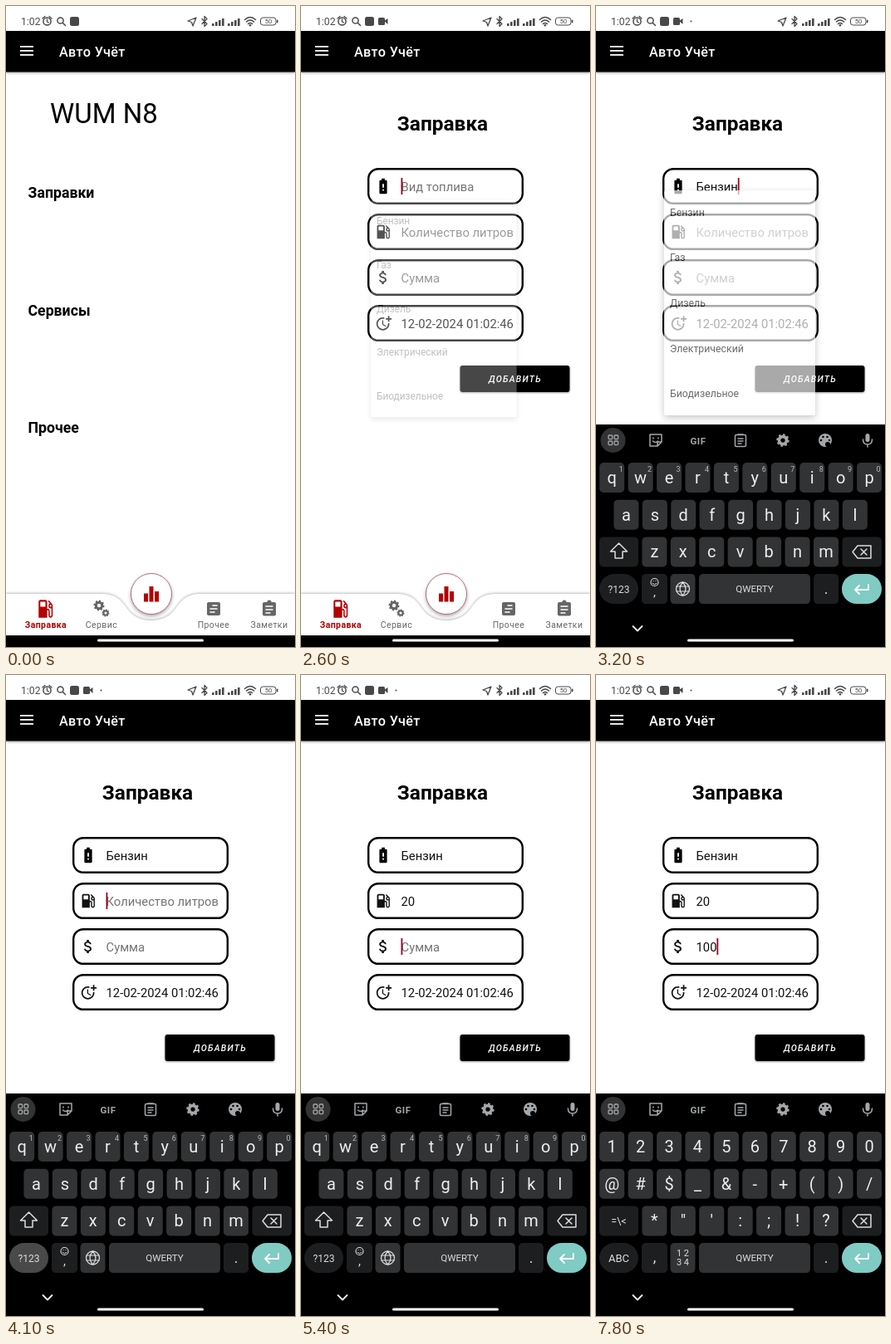
An HTML page for the animation above (8 s loop, 348 by 772 pixels).

```html
<!DOCTYPE html>
<html lang="ru">
<head>
<meta charset="utf-8">
<style>
html, body { margin: 0; width: 100%; height: 100%; overflow: hidden; background: #fff; }
svg { display: block; width: 100vw; height: 100vh; }
text { font-family: Roboto, "Noto Sans", sans-serif; white-space: pre; }
.line { fill: none; stroke-linecap: round; stroke-linejoin: round; }
</style>
</head>
<body>
<svg id="stage" viewBox="0 0 348 772"></svg>
<script>
const RED = '#b40000', GRAY = '#666', KEY = '#323335', DARK = '#1d1e20', PALE = '#a4a8aa';

const text = (x, y, size, str, attrs = '') => `<text x="${x}" y="${y}" font-size="${size}" ${attrs}>${str}</text>`;
const mid = (x, y, size, str, attrs = '') => text(x, y, size, str, 'text-anchor="middle" ' + attrs);
const rect = (x, y, w, h, r, fill, attrs = '') =>
  `<rect x="${x}" y="${y}" width="${w}" height="${h}" rx="${r}" fill="${fill}" ${attrs}/>`;
const disc = (x, y, r, fill, attrs = '') => `<circle cx="${x}" cy="${y}" r="${r}" fill="${fill}" ${attrs}/>`;
const line = (d, color, width = 1.5) => `<path class="line" d="${d}" stroke="${color}" stroke-width="${width}"/>`;
const ring = (x, y, r, color, width = 1.5) => disc(x, y, r, 'none', `stroke="${color}" stroke-width="${width}"`);
// 24-unit icon centred on a point
const icon = (x, y, sx, d, fill, sy = sx) =>
  `<path transform="translate(${x} ${y}) scale(${sx} ${sy}) translate(-12 -12)" d="${d}" fill="${fill}" fill-rule="evenodd"/>`;
const gear = (x, y, r, color) => ring(x, y, r * .6, color, r * .5) +
  disc(x, y, r * .88, 'none', `stroke="${color}" stroke-width="${r * .3}" pathLength="16" stroke-dasharray="1"`);
const group = (id, body, attrs = '') => `<g id="${id}" ${attrs}>${body}</g>`;

const PUMP = 'M19.77 7.23l.01-.01-3.72-3.72L15 4.56l2.11 2.11c-.94.36-1.61 1.26-1.61 2.33 0 1.38 1.12 2.5 2.5 2.5.36 0 .69-.08 1-.21v7.21c0 .55-.45 1-1 1s-1-.45-1-1V14c0-1.1-.9-2-2-2h-1V5c0-1.1-.9-2-2-2H6c-1.1 0-2 .9-2 2v16h10v-7.5h1.5v5c0 1.38 1.12 2.5 2.5 2.5s2.5-1.12 2.5-2.5V9c0-.69-.28-1.32-.73-1.77zM12 10H6V5h6v5zm6 0c-.55 0-1-.45-1-1s.45-1 1-1 1 .45 1 1-.45 1-1 1z';
const BATTERY = 'M15.67 4H14V2h-4v2H8.33C7.6 4 7 4.6 7 5.33v15.33C7 21.4 7.6 22 8.33 22h7.33c.74 0 1.34-.6 1.34-1.33V5.33C17 4.6 16.4 4 15.67 4zM13 18h-2v-2h2v2zm0-4h-2V9h2v5z';
const DOLLAR = 'M11.8 10.9c-2.27-.59-3-1.2-3-2.15 0-1.09 1.01-1.85 2.7-1.85 1.78 0 2.44.85 2.5 2.1h2.21c-.07-1.72-1.12-3.3-3.21-3.81V3h-3v2.16c-1.94.42-3.5 1.68-3.5 3.61 0 2.31 1.91 3.46 4.7 4.13 2.5.6 3 1.48 3 2.41 0 .69-.49 1.79-2.7 1.79-2.06 0-2.87-.92-2.98-2.1h-2.2c.12 2.19 1.76 3.42 3.68 3.83V21h3v-2.15c1.95-.37 3.5-1.5 3.5-3.55 0-2.84-2.43-3.81-4.7-4.4z';
const CLOCK = 'M10 8v6l4.7 2.9.8-1.2-4-2.4V8zM17.92 12c.05.33.08.66.08 1 0 3.9-3.1 7-7 7s-7-3.1-7-7 3.1-7 7-7c.7 0 1.37.1 2 .29V4.23c-.64-.15-1.31-.23-2-.23-5 0-9 4-9 9s4 9 9 9 9-4 9-9c0-.34-.02-.67-.06-1h-2.02zM20 5V2h-2v3h-3v2h3v3h2V7h3V5z';

function statusBar() {
  const c = '#484848';
  const bars = x => [3, 5, 7, 9].map((h, i) => rect(x + i * 4, 24 - h, 2.6, h, .5, c)).join('');
  return rect(0, 0, 348, 30, 0, '#fff') + text(18, 23, 12.2, '1:02', `fill="${c}"`) +
    ring(49.5, 18.5, 4.6, c) + line('M49.5 16v3l2 1M44 15l3-2.500M55 15l-3-2.500', c, 1.3) +
    ring(65.5, 17.5, 3.6, c) + line('M68.500 20.500l3 3', c) +
    rect(77, 13, 11, 11, 2.5, c) +
    group('camera', rect(93, 14, 8, 9, 1.5, c) + `<path d="M100 18l4.500-3v7z" fill="${c}"/>`) +
    group('dot', disc(114.5, 18.5, 1, c)) +
    line('M219 18l10-4-4 10-1.500-4.500z', c, 1.3) +
    line('M236 15.500l6 6-3 3v-12l3 3-6 6', c, 1.3) + bars(248) + bars(267) +
    line('M287.500 16.500q6.500-6 13 0M289.500 19q4.500-4 9 0M291.500 21.500q2.500-2 5 0', c, 1.6) + disc(294, 23.3, 1.3, c) +
    rect(306.5, 14, 18.5, 9, 3, 'none', `stroke="${c}"`) + mid(316, 21.3, 7.5, '50', `fill="${c}"`) +
    rect(326, 16.5, 1.5, 4, .7, c);
}

const appBar = () => rect(0, 30, 348, 49.5, 0, '#000', 'style="filter:drop-shadow(0 1px 1.5px #0006)"') +
  [48, 53, 58].map(y => rect(17, y, 16, 1.8, 0, '#fff')).join('') +
  text(64, 61, 16.2, 'Авто Учёт', 'fill="#fff" font-weight="500" letter-spacing=".35"');

const home = () => text(53, 141, 33, 'WUM N8') +
  ['Заправки', 'Сервисы', 'Прочее'].map((s, i) => text(26.5, 231 + i * 141.5, 17.7, s, 'font-weight="700"')).join('');

function form() {
  const icons = [icon(99, 217, .92, BATTERY, '#000'), icon(99, 272, .93, PUMP, '#111'),
    icon(99, 327, .88, DOLLAR, '#111'), icon(99.5, 382, .87, CLOCK, '#111')];
  return mid(170.5, 150, 24.4, 'Заправка', 'font-weight="700"') +
    icons.map((ic, i) => rect(81.2, 196.2 + i * 55, 185.6, 41.6, 12, '#fff', 'stroke="#000" stroke-width="2.4"') + ic +
      text(120.5, 222.5 + i * 55, 14.8, '', `id="field${i}"`)).join('') +
    rect(0, 207, 1.8, 20, 0, '#a00020', 'id="caret"') +
    rect(191.5, 433, 132, 32, 3, '#000', 'style="filter:drop-shadow(0 1px 1px #0006)"') +
    mid(258, 453, 10.6, 'ДОБАВИТЬ', 'fill="#fff" font-weight="500" font-style="italic" letter-spacing="1.2"');
}

const menu = () => rect(82, 222, 182, 271, 2, '#fff', 'style="filter:drop-shadow(0 3px 4px #0005)"') +
  ['Бензин', 'Газ', 'Дизель', 'Электрический', 'Биодизельное']
    .map((s, i) => text(89, 252.5 + i * 54.7, 12.3, s, 'fill="#222"')).join('');

function navBar() {
  const label = (x, s, attrs = `fill="${GRAY}"`) => mid(x, 749, 10.5, s, 'letter-spacing=".4" ' + attrs);
  const shape = 'M0 708H113C133 708 138 715 146 726C159 745 191 745 204 726C212 715 217 708 237 708H348V758H0Z';
  return `<path d="${shape}" fill="#fff" style="filter:drop-shadow(0 -1px 1.5px #0004)"/>` +
    disc(0, 0, 0, RED, 'id="ripple"') +
    icon(47.5, 726, 1.03, PUMP, RED, 1.2) + label(48, 'Заправка', `fill="${RED}" font-weight="700"`) +
    gear(112, 722, 6.3, GRAY) + gear(120, 731, 4.4, GRAY) + label(115, 'Сервис') +
    rect(242, 718, 16, 16, 2, GRAY) + line('M249 722h5M246 726h8M246 730h5', '#fff', 1.6) + label(250, 'Прочее') +
    rect(309, 718, 16, 16.5, 2, GRAY) + disc(317, 718, 2.6, GRAY) +
    line('M313 723h8M313 727h8M313 731h5', '#fff', 1.5) + label(317, 'Заметки') +
    disc(175, 708, 24.5, '#fff', 'stroke="#a05058" stroke-width=".8" style="filter:drop-shadow(0 2px 2px #0005)"') +
    rect(166, 707.5, 5, 10, 0, RED) + rect(172.5, 699, 5, 18.5, 0, RED) + rect(179, 705, 5, 12.5, 0, RED) +
    rect(0, 758, 348, 14, 0, '#000') + rect(110, 762.5, 128, 3, 1.5, '#fff');
}

const colX = i => 19.2 + i * 34.43;
const rowY = r => 550 + r * 44.7;
const key = (x, row, label, size = 20, w = 30) => rect(x - w / 2, rowY(row), w, 36, 5, KEY) +
  mid(x, rowY(row) + 25, size, label, 'fill="#eee"');
const keys = (chars, row, x0) => [...chars].map((c, i) =>
  key(colX(i) + x0, row, c.replace('&', '&amp;'))).join('');

function keyboard() {
  const white = 'fill="#ddd"';
  const toolbar = disc(20.5, 523, 15, '#333') +
    [[15, 517], [22, 517], [15, 524], [22, 524]].map(([x, y]) => rect(x, y, 4.6, 4.6, 1, 'none', `stroke="${PALE}" stroke-width="1.3"`)).join('') +
    line('M65 516h14v9l-5 5h-9zM79 525h-5v5M69 520v1M75 520v1M68.500 524q3 3 6 0', PALE) +
    mid(123, 527.5, 11.5, 'GIF', `fill="${PALE}" font-weight="700" letter-spacing=".5"`) +
    rect(167.5, 516.5, 13, 14, 1.5, 'none', `stroke="${PALE}" stroke-width="1.5"`) +
    line('M171 516h6M171 521h6M171 524h6M171 527h4', PALE) + gear(225, 523, 7.5, PALE) +
    disc(276, 523, 8, PALE) + disc(271, 523, 1.3, '#000') + disc(273.5, 519, 1.3, '#000') + disc(278.5, 519, 1.3, '#000') +
    disc(281, 523, 1.3, '#000') + disc(279, 528, 3, '#000') +
    rect(324.5, 515, 5, 10, 2.5, PALE) + line('M321.500 522q0 6 5.500 6t5.500-6M327 528v3', PALE);
  const shared = rect(4, rowY(2), 47, 36, 5, DARK) + rect(296.5, rowY(2), 47.5, 36, 5, DARK) +
    line('M309 657.500l6-7.500h16v15h-16zM319 654l7 7M326 654l-7 7', '#ddd') +
    rect(4, rowY(3), 47, 36, 18, DARK) + rect(4, rowY(3), 47, 36, 18, '#666', 'id="press"') +
    rect(55, rowY(3), 31, 36, 5, DARK) + rect(89.5, rowY(3), 30, 36, 5, KEY) +
    rect(124, rowY(3), 134, 36, 5, KEY) + mid(191, 706, 11.6, 'QWERTY', white) +
    rect(262, rowY(3), 30, 36, 5, DARK) + mid(277, 708, 18, '.', white) +
    rect(296, rowY(3), 48, 36, 18, '#80cbc4') + line('M328 697v6h-16M317 698l-5 5 5 5', '#fff', 1.8);
  const letters = keys('qwertyuiop', 0, 0) +
    [...'1234567890'].map((d, i) => mid(colX(i) + 11, 560.5, 9, d, 'fill="#bbb"')).join('') +
    keys('asdfghjkl', 1, 17.2) + keys('zxcvbnm', 2, 51.2) +
    line('M27.500 647l-10 10h5.500v8h9v-8h5.500z', '#ddd') + mid(27.5, 706.5, 12, '?123', white) +
    ring(70.5, 694, 4.5, '#ddd', 1.1) + line('M68 695.500q2.500 2.500 5 0M69 692.500v.1M72 692.500v.1', '#ddd', 1) +
    mid(70.5, 711, 15, ',', white) +
    ring(104.5, 702, 8, '#ddd', 1.3) + line('M97 699h15M97 705h15M104.500 694q-7 8 0 16q7-8 0-16', '#ddd', 1.2);
  const symbols = keys('1234567890', 0, 0) + keys('@#$_&-+()/', 1, 0) + keys('*"\':;!?', 2, 51.2) +
    mid(27.5, 662, 12.5, '=\\&lt;', white) + mid(27.5, 707, 13, 'ABC', white) + mid(70.5, 707, 18, ',', white) +
    mid(104.5, 700, 11, '1 2', white) + mid(104.5, 711, 11, '3 4', white);
  const popup = rect(-15, 550, 30, 36, 5, DARK) + mid(0, 575, 20, '', 'fill="#555" class="digit"') +
    disc(0, 521, 24, '#37383a') + mid(0, 529, 23, '', 'fill="#fff" class="digit"') +
    [-4, 0, 4].map(x => disc(x, 539, .9, '#ddd')).join('');
  return rect(0, 504, 348, 268, 0, '#000') + toolbar + shared + group('letters', letters) + group('symbols', symbols) +
    group('popup', popup) + line('M44.500 747l5.500 5.500 5.500-5.500', '#eee', 1.8) + rect(110, 762.5, 128, 3, 1.5, '#fff');
}

document.getElementById('stage').innerHTML = rect(0, 0, 348, 772, 0, '#fff') + group('home', home()) + group('form', form()) +
  group('menu', menu()) + appBar() + statusBar() + navBar() + group('keyboard', keyboard());

const $ = id => document.getElementById(id);
const set = (id, attrs) => { for (const k in attrs) $(id).setAttribute(k, attrs[k]); };
const show = (id, on) => set(id, { visibility: on ? 'visible' : 'hidden' });
const ramp = (t, a, b) => Math.min(1, Math.max(0, (t - a) / (b - a)));
const within = (t, a, b) => t >= a && t < b;
const latest = (t, steps) => steps.reduce((v, [at, s]) => t >= at ? s : v, '');

const hints = ['Вид топлива', 'Количество литров', 'Сумма', ''];
const typed = [
  [[3100, 'Бензин']],
  [[4800, '2'], [5000, '20']],
  [[6400, '1'], [6800, '10'], [7700, '100']],
  [[0, '12-02-2024 01:02:46']]
];
const taps = [[4700, 4800, '2'], [4900, 5000, '0'], [6700, 6800, '0'], [7600, 7800, '0']];

function draw(t) {
  show('camera', t >= 100);
  show('dot', t >= 3000);
  set('home', { opacity: 1 - ramp(t, 1950, 2150) });
  set('form', { opacity: ramp(t, 2050, 2350) });

  const grow = ramp(t, 1680, 2030);
  set('ripple', { cx: 33 + 15 * grow, cy: 733 - grow, r: t < 1680 ? 0 : 6 + 19 * grow,
    opacity: .17 * (1 - ramp(t, 2050, 2450)) });

  const values = typed.map(steps => latest(t, steps));
  values.forEach((v, i) => {
    $('field' + i).textContent = v || hints[i];
    set('field' + i, { fill: v ? '#111' : '#757575' });
  });
  const focus = t < 3500 ? 0 : t < 5400 ? 1 : 2;
  const width = values[focus] ? $('field' + focus).getComputedTextLength() : 0;
  set('caret', { x: 120.5 + width, y: 207 + focus * 55 });
  show('caret', t >= 2500 && !within(t, 7300, 7700));

  const open = ramp(t, 2560, 2780), scale = .95 + .05 * open;
  set('menu', { opacity: Math.min(open, 1 - ramp(t, 3150, 3360)),
    transform: `translate(143 546) scale(${scale}) translate(-143 -546)` });

  const rise = 1 - (1 - ramp(t, 2700, 3000)) ** 3;
  set('keyboard', { transform: `translate(0 ${268 * (1 - rise)})` });
  show('keyboard', rise > 0);
  const numeric = within(t, 4200, 5400) || t >= 5900;
  set('letters', { display: numeric ? 'none' : 'inline' });
  set('symbols', { display: numeric ? 'inline' : 'none' });
  set('press', { opacity: within(t, 4100, 4300) || within(t, 5800, 6000) ? .6 : 0 });

  const tap = taps.find(([a, b]) => within(t, a, b));
  set('popup', { display: tap ? 'inline' : 'none' });
  if (tap) {
    set('popup', { transform: `translate(${colX((+tap[2] + 9) % 10)} 0)` });
    document.querySelectorAll('.digit').forEach(el => el.textContent = tap[2]);
  }
}

function tick() {
  draw((performance.now() + 20) % 8000);
  requestAnimationFrame(tick);
}
tick();
</script>
</body>
</html>
```
